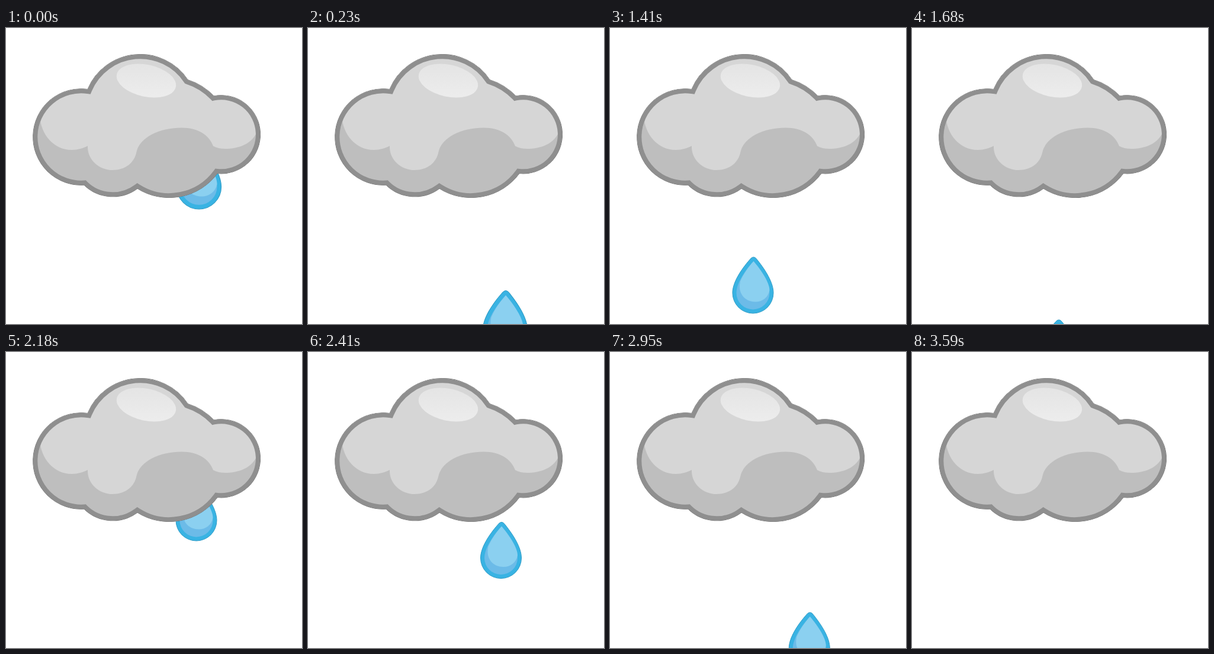
Write an HTML page that moves like this. It is 500 by 500 pixels and loops after 3720 ms.

```html
<!DOCTYPE html>
<html lang="en">
<head>
<meta charset="utf-8">
<title>Rain cloud</title>
<style>
  html, body { margin: 0; width: 100%; height: 100%; overflow: hidden; background: #fff; }
  svg { display: block; width: 100%; height: 100%; }
</style>
</head>
<body>
<svg viewBox="0 0 500 500">
  <defs>
    <path id="outline" d="M138 103.500 A96.500 96.500 0 0 1 307 87.500 Q332 95.500 351 115
      A66 66 0 1 1 357 245.500 A101 101 0 0 1 222 271 A69.500 69.500 0 0 1 132 265
      A81.200 81.200 0 1 1 138 103.500 Z"/>
    <clipPath id="inside"><use href="#outline"/></clipPath>
    <linearGradient id="shine" x1="0" y1="0" x2="0.4" y2="1">
      <stop offset="0" stop-color="#e3e3e3"/>
      <stop offset="1" stop-color="#ececec"/>
    </linearGradient>
    <!-- Tip at the origin, 95 tall -->
    <g id="drop">
      <path fill="#39b3e3" stroke="#2f9cc6" d="M1 0 C4 0 6 3 8 5.500 C21 22 34.500 43 34.500 60.500
        A34.500 34.500 0 0 1 -34.500 60.500 C-34.500 43 -20 21 -6 5 C-4 2.500 -2 0 1 0 Z"/>
      <path fill="#6cbbe8" d="M1 7 C14 22 28 44 28 60.500
        A28 28 0 0 1 -28 60.500 C-28 44 -13 22 1 7 Z"/>
      <path fill="#8bd0f0" d="M1 7 C14 22 28 43 28 56 C26 68 16 75.500 4 75.500
        C-12 75.500 -22.500 64 -22.500 50 Q-22.500 46 -21.500 41 C-16 28 -8 17 1 7 Z"/>
    </g>
  </defs>
  <g id="rain"></g>
  <use href="#outline" stroke="#707070" stroke-width="1.2"/>
  <g clip-path="url(#inside)">
    <use href="#outline" fill="#bebebe"/>
    <path fill="#d6d6d6" d="M57 148 C58.500 180 81 206 111 206 C121 206 131 203 138 199
      C137 222 157 240 180 240 C201 240 217 228 220.500 209 C226.500 185 258 168.500 297 168.500
      C325 168.500 343 181 350 199.500 C357 203 364 204.500 374 204 C398 203 417 193 424 175
      L440 20 H20 Z"/>
    <ellipse cx="237" cy="89" rx="51" ry="27" transform="rotate(12 237 89)" fill="url(#shine)"/>
    <use href="#outline" fill="none" stroke="#8f8f8f" stroke-width="15"/>
  </g>
</svg>
<script>
const LOOP = 3720, FPS = 22, HIDDEN_ABOVE = 150;

// Position of the tip at a given step, and its change per step
const drops = [
  { step: 0, x: 326, y: 202.3, dx: 1.4, dy: 48.3, size: 1.09 },
  { step: 31, x: 241.5, y: 387, dx: 0.94, dy: 17.67, size: 1 },
  { step: 58, x: 330.5, y: 351, dx: 0.9, dy: 12.7, size: 1 }
];

const rain = document.getElementById("rain");
for (const drop of drops) {
  drop.el = document.createElementNS("http://www.w3.org/2000/svg", "use");
  drop.el.setAttribute("href", "#drop");
  rain.append(drop.el);
}

function draw(now) {
  const time = now % LOOP;
  const step = Math.floor((Math.floor(time / 10) * 10 + 5) * FPS / 1000);
  for (const { el, step: start, x, y, dx, dy, size } of drops) {
    const n = step - start, tip = y + n * dy;
    el.setAttribute("visibility", tip > HIDDEN_ABOVE && tip < 500 ? "visible" : "hidden");
    el.setAttribute("transform", `translate(${x + n * dx} ${tip}) scale(${size})`);
  }
  requestAnimationFrame(draw);
}
draw(performance.now());
</script>
</body>
</html>
```
